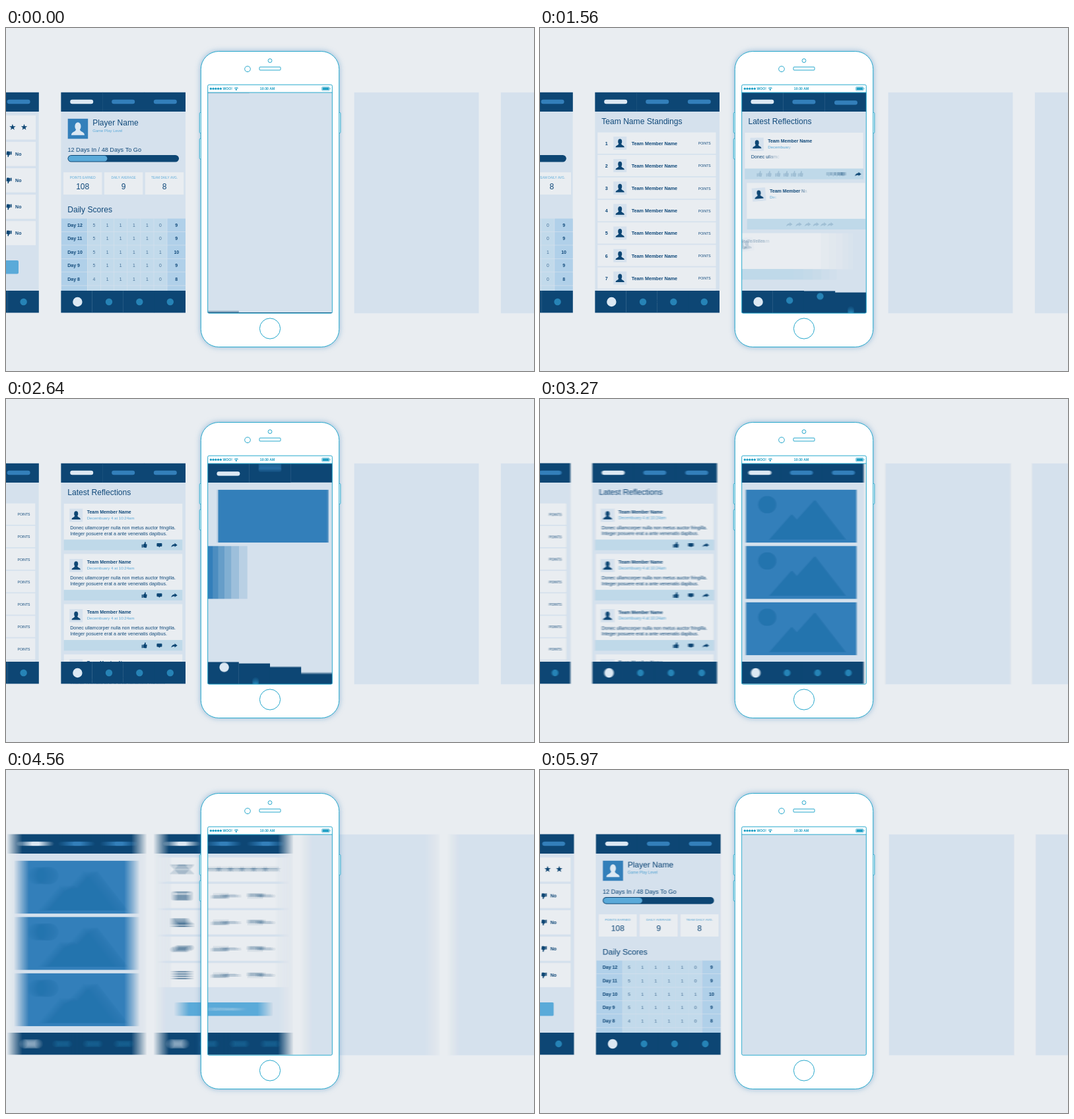
Write an HTML page with a canvas that moves like this. It is 800x521 px and loops after 6 s.

```html
<!DOCTYPE html>
<html lang="en">
<head>
<meta charset="utf-8">
<title>App screens</title>
<style>
html, body { margin: 0; width: 100%; height: 100%; overflow: hidden; background: #e9edf1; }
canvas { display: block; width: 800px; height: 521px; }
</style>
</head>
<body>
<canvas id="stage"></canvas>
<script>
const W = 800, H = 521, LOOP = 6000, PERIOD = 1200, SLIDE_AT = 810, SLIDE = 390;
const X0 = 83.2, PITCH = 222.2, PW = 188.8, TOP = 98, BOTTOM = 432.5, SHUTTER = 17;
const BG = '#e9edf1', PANEL = '#d5e1ed', NAVY = '#0d4674', INK = '#114a7b', MID = '#337fba',
  SKY = '#5aaad9', PALE = '#dce8f3', DOT = '#2683b6', LINE = '#27a8cc', FOOT = '#bfd9e9';
const DONE = 1e6;
const dpr = window.devicePixelRatio || 1;

function makeCanvas(w, h, s, el) {
  const c = el || document.createElement('canvas');
  c.width = Math.round(w * s);
  c.height = Math.round(h * s);
  const ctx = c.getContext('2d');
  ctx.scale(s, s);
  return ctx;
}
const main = makeCanvas(W, H, dpr, document.getElementById('stage'));
const layer = makeCanvas(W, H, dpr);
let g = main;

// ---- timing helpers
const clamp = v => Math.max(0, Math.min(1, v));
const inOut = u => u < .5 ? 2 * u * u : 1 - 2 * (1 - u) * (1 - u);
const settle = (age, from, span) => from * Math.pow(1 - clamp(age / span), 3);
function pop(age, from, over) {
  if (age < 90) return from + (over - from) * inOut(clamp(age / 90));
  return over * Math.pow(1 - clamp((age - 90) / 120), 2);
}
const grow = age => 1 + pop(age, -1, .12);
const typed = (s, age, span) => s.slice(0, Math.round(s.length * clamp(age / span)));
function slideEase(u) {
  const a = 4.6 * Math.pow(u, 3.15);
  return a / (a + Math.pow(1 - u, 1.4));
}

// ---- drawing helpers
function box(x, y, w, h, fill, r = 0) {
  g.fillStyle = fill;
  if (!r) return g.fillRect(x, y, w, h);
  g.beginPath();
  g.roundRect(x, y, w, h, r);
  g.fill();
}
function disc(x, y, r, fill) {
  if (r <= 0) return;
  g.fillStyle = fill;
  g.beginPath();
  g.arc(x, y, r, 0, 7);
  g.fill();
}
function poly(pts, fill) {
  g.fillStyle = fill;
  g.beginPath();
  for (let i = 0; i < pts.length; i += 2) g.lineTo(pts[i], pts[i + 1]);
  g.fill();
}
function text(s, x, y, size, fill = INK, bold = false, align = 'left') {
  g.font = (bold ? 'bold ' : '') + size + 'px "Liberation Sans", Arial, Helvetica, sans-serif';
  g.fillStyle = fill;
  g.textAlign = align;
  g.fillText(s, x, y);
}
function placed(x, y, scale, draw, turn = 0) {
  if (scale <= 0) return;
  g.save();
  g.translate(x, y);
  g.rotate(turn);
  g.scale(scale, scale);
  draw();
  g.restore();
}
function avatar(x, y, size, back, front, scale = 1, turn = 0) {
  placed(x + size / 2, y + size / 2, scale * size / 20, () => {
    box(-10, -10, 20, 20, back);
    g.fillStyle = front;
    g.beginPath();
    g.ellipse(0, -2.4, 3, 4, 0, 0, 7);
    g.fill();
    g.beginPath();
    g.moveTo(-6.6, 6.3);
    g.bezierCurveTo(-6.4, 2.6, -2, 3.8, -1.8, 0);
    g.lineTo(1.8, 0);
    g.bezierCurveTo(2, 3.8, 6.4, 2.6, 6.6, 6.3);
    g.fill();
  }, turn);
}
function star(x, y, scale) {
  placed(x, y, scale, () => {
    const p = [];
    for (let i = 0; i < 10; i++) {
      const r = i % 2 ? 2 : 5, a = i * Math.PI / 5;
      p.push(r * Math.sin(a), -r * Math.cos(a));
    }
    poly(p, NAVY);
  });
}
function thumb(x, y, scale, down) {
  placed(x, y, scale, () => {
    if (down) g.rotate(Math.PI);
    box(-4, -1, 1.6, 5, NAVY, .4);
    poly([-1.9, -.8, .2, -2.2, .6, -4.6, 2, -4.4, 2, -1.4, 4, -1, 3.4, 3.6, 2.4, 4.2, -1.9, 3.6], NAVY);
  });
}
const bubble = (x, y) => {
  box(x - 4, y - 3, 8, 5, NAVY, 1);
  poly([x - 1.5, y + 1.5, x + 1.5, y + 1.5, x, y + 3.4], NAVY);
};
const share = (x, y) => {
  g.fillStyle = NAVY;
  g.beginPath();
  g.moveTo(x - 4.6, y + 3);
  g.quadraticCurveTo(x - 3.6, y - 1.6, x + .6, y - 1.5);
  g.lineTo(x + .6, y - 3.3);
  g.lineTo(x + 4.8, y);
  g.lineTo(x + .6, y + 2.8);
  g.lineTo(x + .6, y + 1.2);
  g.quadraticCurveTo(x - 2.6, y + .8, x - 4.6, y + 3);
  g.fill();
};

// ---- screens, in panel coordinates; a = age of the build-up
function title(s, a, y = 145.5, start = 150) {
  text(s, 10 + pop(a - start, -190, 6), y, 12.1);
}

function standings(a) {
  title('Team Name Standings', a);
  for (let i = 0; i < 8; i++) {
    const t = a - 110 - 22 * i, y = 158.6 + 34.15 * i, x = pop(t, -195, 6);
    box(4 + x, y, 179.3, 32.4, BG);
    text(i + 1, 17.5 + x, y + 19.2, 7.2, INK, true, 'center');
    const tilt = pop(t - 20, -1, .12);
    avatar(28 + x, y + 6.3, 20, PANEL, NAVY, 1 + tilt, tilt);
    text(typed('Team Member Name', t - 60, 110), 55.5 + x, y + 19.2, 7.2, INK, true);
    text('POINTS', 175.5 + pop(t - 70, -200, 5), y + 18.7, 5.1, INK, false, 'right');
  }
}

const LOREM = ['Donec ullamcorper nulla non metus auctor fringilla.',
  'Integer posuere erat a ante venenatis dapibus.'];
function reflections(a) {
  title('Latest Reflections', a);
  for (let i = 0; i < 4; i++) {
    const t = a - 180 - 60 * i, y = 159 + 76.3 * i, x = pop(t, -195, 6);
    box(4.5 + x, y, 179.5, 55, BG);
    box(4.5 + pop(t - 10, -195, 6), y + 54.5, 179.5, 16.2, FOOT);
    avatar(13 + x, y + 7.6, 20, PANEL, NAVY, 1, pop(t - 10, -.4, -.12));
    text(typed('Team Member Name', t - 30, 115), 39.5 + x, y + 14.8, 6.95, INK, true);
    text(typed('Decembuary 4 at 10:24am', t - 105, 172), 39.5 + x, y + 23.6, 6.1, SKY);
    const n = Math.round(97 * clamp((t - 147) / 350));
    text(LOREM[0].slice(0, n), 14 + x, y + 38.8, 7.1);
    text(LOREM[1].slice(0, Math.max(0, n - 51)), 14 + x, y + 47.5, 7.1);
    share(171.7 + pop(t - 70, -185, 7), y + 63);
    bubble(149.2 + pop(t - 105, -185, 7), y + 63);
    thumb(126.5 + pop(t - 130, -185, 7), y + 62.7, 1);
  }
}

function gallery(a) {
  for (let i = 0; i < 3; i++) {
    const t = a - 150 - 60 * i;
    g.save();
    g.translate(pop(t, -195, 6), 85.5 * i);
    g.beginPath();
    g.rect(10.5, 137.7, 167.5, 80.5);
    g.clip();
    box(10.5, 137.7, 167.5, 80.5, MID);
    disc(42.7, 160.5, 13 * grow(t - 100), '#2374ae');
    g.translate(0, pop(t - 160, 70, -4));
    poly([46.5, 213.4, 79.8, 175.5, 87.6, 184, 114.8, 153.8, 161, 213.4], '#2374ae');
    g.restore();
  }
}

const rowIcons = [
  () => {
    g.strokeStyle = NAVY;
    g.lineWidth = 2.4;
    g.beginPath();
    g.moveTo(-7, -7); g.lineTo(7, 7);
    g.moveTo(7, -7); g.lineTo(-7, 7);
    g.stroke();
    poly([-8, -8, -2, -7, -5, -3], NAVY);
    poly([8, -8, 2, -7, 5, -3], NAVY);
  },
  () => { box(-6, -7, 12, 14, NAVY, 3); box(-3.5, -4.5, 7, 3, BG, 1); },
  () => { poly([-8, -6, 0, -6, 3, -1, 8, 2, 8, 4, -8, 4], NAVY); box(-8, 5, 16, 2, NAVY); },
  () => { g.rotate(-.35); box(-8, -4, 16, 8, NAVY, 4); box(-.6, -4, 1.2, 8, BG); },
  () => { for (let i = 0; i < 4; i++) box(-7, -6 + 3.4 * i, 14, 2, NAVY, 1); }
];
function form(a) {
  for (let i = 0; i < 5; i++) {
    const t = a - 150 - 50 * i, y = 132.8 + 40.1 * i, x = pop(t, -195, 6), mid = y + 18.3;
    box(4.5 + x, y, 179.5, 36.7, BG);
    placed(31.5 + x, mid, grow(t - 60), rowIcons[i]);
    if (!i) {
      for (let j = 0; j < 6; j++) star(78.5 + 17.6 * j + x, mid - .3, grow(t - 100 - 35 * j));
      continue;
    }
    ['Yes', 'No'].forEach((s, j) => {
      const u = t - 110 - 70 * j, o = 54.3 * j;
      thumb(89.2 + o + x, mid + .2, grow(u), j);
      text(typed(s, u - 30, 80), 98.8 + o + x, mid + 2.5, 7, INK, true);
    });
  }
  const y = pop(a - 400, 90, -4);
  box(31, 353 + y, 127, 20.5, SKY, 2);
  text(typed('Submit Answers', a - 510, 250), 70.5, 365.7 + y, 7, PALE);
}

function player(a) {
  avatar(10.5, 137.8, 30.5, MID, PALE, grow(a - 100));
  text(typed('Player Name', a - 150, 130), 48, 147.8, 12);
  text(typed('Game Play Level', a - 190, 140), 48, 157.6, 5.95, SKY);
  text(typed('12 Days In / 48 Days To Go', a - 150, 220), 10.2, 187.8, 9.15);
  const bar = 168.5 * inOut(clamp((a - 120) / 180)), fill = 59 * inOut(clamp((a - 220) / 180));
  if (bar > 1) box(10.3, 193, bar, 10.6, NAVY, 5.3);
  if (fill > 1) box(11.2, 194, fill, 8.6, SKY, 4.3);
  [['POINTS EARNED', 108], ['DAILY AVERAGE', 9], ['TEAM DAILY AVG.', 8]].forEach(([s, n], i) => {
    const t = a - 150 - 45 * i;
    placed(33 + 61.9 * i, 236, grow(t), () => {
      box(-29.2, -16.8, 58.4, 33.8, BG);
      text(s, 0, -7, 4.75, SKY, false, 'center');
      text(Math.round(n * clamp((t - 30) / 150)), 0, 8.6, 12, INK, false, 'center');
    });
  });
  title('Daily Scores', a, 280.3, 180);
  const last = [9, 9, 10, 9, 8, 9];
  for (let r = 0; r < 6; r++) {
    const y = 289.5 + 20.4 * r;
    for (let c = 0; c < 8; c++) {
      const edge = c === 0 || c === 7, x = c ? 20.5 + 20.1 * c : .8;
      const w = c === 0 ? 39 : c === 7 ? 27.8 : 19.4;
      const value = c === 0 ? 'Day ' + (12 - r) : c === 7 ? last[r]
        : c === 1 ? (r === 4 ? 4 : 5) : c === 6 ? (r === 2 ? 1 : 0) : 1;
      const k = inOut(clamp((a - 200 - 25 * r - 20 * c) / 120));
      placed(x + w / 2, y + 9.9, k, () => {
        box(-w / 2, -9.9, w, 19.7, edge ? '#b0d0e9' : '#c2daeb');
        text(value, c ? 0 : -10.3, 2.6, edge ? 7 : 6.8, edge ? INK : '#467299', edge, c ? 'center' : 'left');
      });
    }
  }
}

const screens = [standings, reflections, gallery, form, player];

function chrome(a) {
  for (let i = 0; i < 3; i++) {
    box(62.9 * i, TOP - .5 + settle(a - 40 * i, -32, 200), 63.2, 29.5, NAVY);
  }
  [14, 77, 140.6].forEach((x, i) =>
    box(x, 108.8 + pop(a - 130 - 60 * i, -25, 2), 35, 6.5, i ? MID : PALE, 3.25));
  for (let i = 0; i < 4; i++) {
    box(47.2 * i, 399 + settle(a - 60 * i, 33, 320), 47.4, 40, NAVY);
  }
  [25.2, 72.8, 119.1, 165.6].forEach((x, i) =>
    disc(x, 416 + pop(a - 150 - 60 * i, 25, -9), i ? 5.2 : 7.2, i ? DOT : PALE));
}

function panel(x, screen, age) {
  g.save();
  g.translate(x, 0);
  g.beginPath();
  g.rect(0, TOP - .5, PW, (age < DONE ? 433 : BOTTOM) - TOP + .5);
  g.clip();
  box(0, 90, PW, 350, PANEL);
  screen(age);
  chrome(age);
  g.restore();
}
const blank = x => box(x, TOP - .2, PW, 335.5, PANEL);

// finished screens at double size, used while the row moves
const shots = screens.map(s => {
  g = makeCanvas(192, 340, 2 * dpr);
  g.translate(0, -96);
  panel(0, s, DONE);
  const c = g.canvas;
  g = main;
  return c;
});

// average several moments into one picture
function blend(count, t, draw) {
  for (let i = 0; i < count; i++) {
    g = layer;
    draw(t + (i / (count - 1) - .5) * SHUTTER);
    g = main;
    g.globalAlpha = 1 / (i + 1);
    g.drawImage(layer.canvas, 0, 0, W, H);
  }
  g.globalAlpha = 1;
}

// ---- phone
function bodyPath() {
  g.roundRect(295.3, 35.5, 209.4, 449, 27);
}
function ring(x, y, r) {
  g.beginPath();
  g.arc(x, y, r, 0, 7);
  g.stroke();
}
function frame(x, y, w, h, r) {
  g.beginPath();
  g.roundRect(x, y, w, h, r);
  g.stroke();
}
function phone() {
  g.save();
  g.beginPath();
  g.rect(0, 0, W, H);
  bodyPath();
  g.clip('evenodd');
  g.shadowColor = 'rgba(50,125,190,.55)';
  g.shadowBlur = 9 * dpr;
  g.fillStyle = '#fff';
  g.beginPath();
  bodyPath();
  g.fill();
  g.restore();

  g.strokeStyle = LINE;
  g.lineWidth = 1;
  g.fillStyle = '#fff';
  [[293.3, 128.5], [293.3, 168], [503.2, 128.5]].forEach(([x, y]) => {
    g.beginPath();
    g.roundRect(x, y, 3.6, 31, 1.2);
    g.fill();
    g.stroke();
  });
  g.beginPath();
  bodyPath();
  g.rect(305.6, 98, 188.8, 335);
  g.fill('evenodd');
  g.beginPath();
  bodyPath();
  g.stroke();

  frame(305.7, 86.2, 188.6, 347, 2);
  g.beginPath();
  g.moveTo(305.7, 98);
  g.lineTo(494.3, 98);
  g.stroke();
  ring(400, 49.6, 2.9);
  ring(366, 62.3, 4.3);
  frame(384, 59.2, 32, 4.8, 1);
  ring(400, 456.5, 15.6);

  const tint = '#1a9dc4';
  for (let i = 0; i < 5; i++) disc(310.3 + 3.75 * i, 92.2, 1.6, tint);
  text('WOO!', 328.4, 94, 5.1, tint, true);
  text('10:30 AM', 396, 94, 5.1, tint, true, 'center');
  g.strokeStyle = tint;
  g.lineWidth = 1.1;
  [1.9, 3.7].forEach(r => {
    g.beginPath();
    g.arc(348.8, 94.2, r, -2.4, -.74);
    g.stroke();
  });
  disc(348.8, 94, .9, tint);
  g.lineWidth = .6;
  frame(478.6, 89.5, 11.4, 5.4, 1);
  box(479.5, 90.4, 9.6, 3.6, tint);
  box(490.4, 91.2, .9, 2, tint);
}

function row(k, shift, still) {
  box(0, 0, W, H, BG);
  for (let j = -1; j < 5; j++) {
    const x = X0 + PITCH * j - shift;
    if (j > 1) blank(x);
    else if (still && j === 1) continue;
    else {
      const n = (k + j + 4) % 5;
      if (still) panel(x, screens[n], DONE);
      else g.drawImage(shots[n], x, 96, 192, 340);
    }
  }
}

function render(t) {
  const k = Math.floor(t / PERIOD), m = t % PERIOD;
  g = main;
  g.imageSmoothingQuality = layer.imageSmoothingQuality = 'high';
  if (m > SLIDE_AT + 30) {
    blend(12, m, s => row(k, PITCH * slideEase(clamp((s - SLIDE_AT) / SLIDE)), false));
  } else {
    row(k, 0, true);
    g.save();
    g.beginPath();
    g.rect(305, 97, 190, 337);
    g.clip();
    blend(6, m, s => panel(X0 + PITCH, screens[k], s));
    g.restore();
  }
  phone();
}

const start = performance.now();
function tick() {
  render((performance.now() - start) % LOOP);
  requestAnimationFrame(tick);
}
tick();
</script>
</body>
</html>
```
